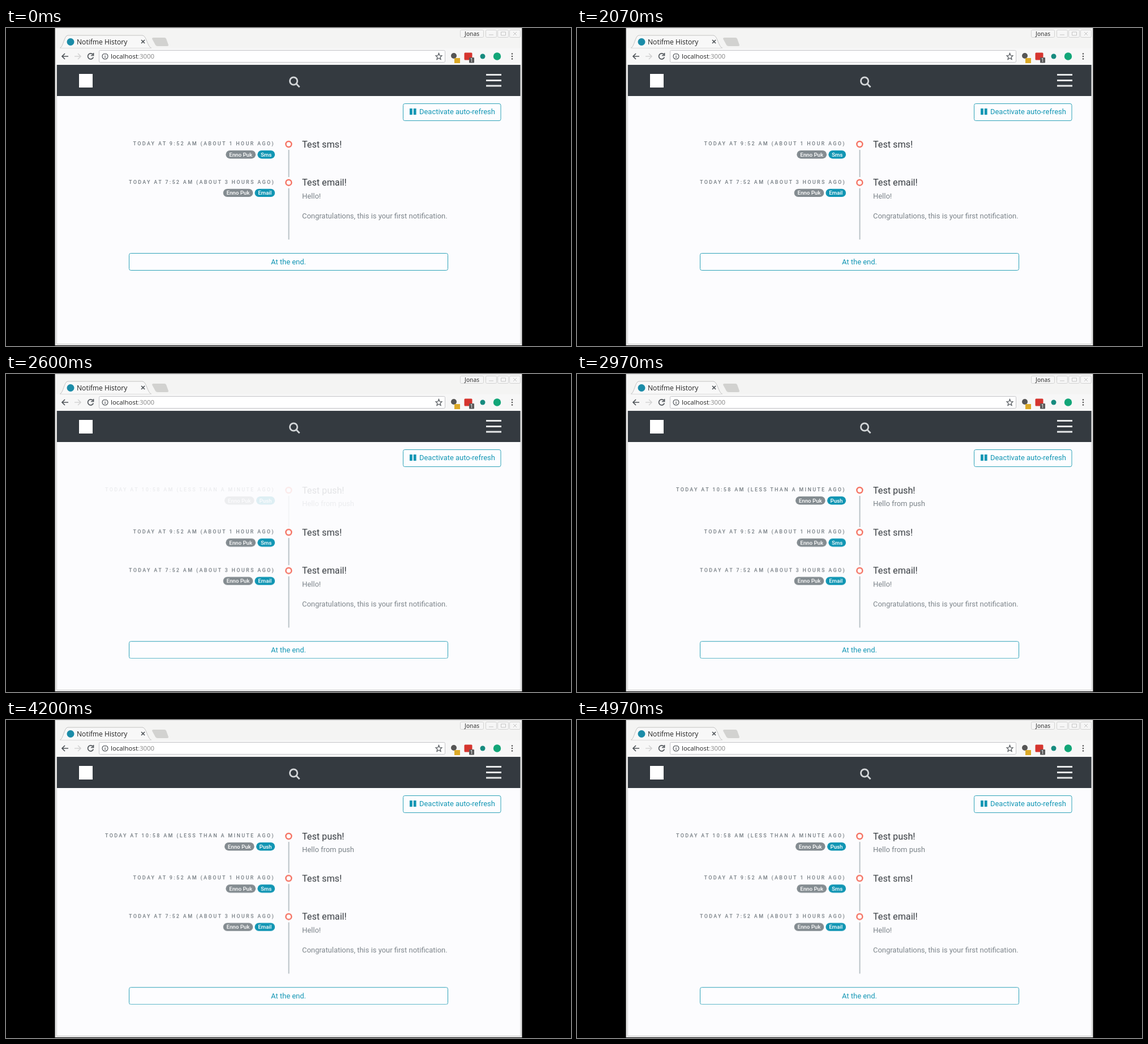
Recreate the animation shown at these times as an HTML page. Size 998 px wide and 561 px high, loop 5010 ms.

```html
<!DOCTYPE html>
<html lang="en">
<head>
<meta charset="utf-8">
<title>Notifme History</title>
<style>
  html, body { margin: 0; width: 100%; height: 100%; overflow: hidden; background: #000; }
  svg { display: block; width: 998px; height: 561px; }
  text { font-family: Roboto, Arial, sans-serif; font-size: 12.94px; fill: #7b8389; }
  .ui { font-family: "Open Sans", "Noto Sans", sans-serif; font-size: 12.1px; font-weight: 500; fill: #222; }
  .url { font-size: 11.45px; }
  .user { font-size: 10px; font-weight: 600; fill: #555; text-anchor: middle; }
  .title { font-size: 16.18px; fill: #373c41; }
  .date { font-size: 8.96px; font-weight: 500; letter-spacing: 2.35px; fill: #737b81; }
  .pill { font-size: 9.7px; font-weight: 500; fill: #fff; text-anchor: middle; }
  .count { font-size: 8.5px; fill: #fff; text-anchor: middle; }
  .teal { fill: #1296b4; }
  .box { fill: #fdfdff; stroke: #2ea2b8; }
  .icon { fill: none; stroke: #50555a; stroke-width: 1.7; }
  .thin { stroke-width: 1.2; }
  .off { stroke: #d4d4d4; }
  .win { fill: #f6f6f6; stroke: #d2d2d2; }
</style>
</head>
<body>
<svg viewBox="0 0 998 561">
  <!-- window and tab strip -->
  <rect x="86.5" width="825" height="560" fill="#e4e4e4"/>
  <rect x="88" y="1" width="822" height="557.5" fill="#f4f4f3"/>
  <path d="M95 35.5C101 34 103 13 109 13H241C248 13 250 34 257 35.5Z" fill="#f8f8f8" stroke="#c2c2c2"/>
  <path d="M260 17H280Q282 17 283 19L287 30Q287 32 285 32H268Q265 32 264 30L258 19Q258 17 260 17Z" fill="#d2d2d0"/>
  <circle cx="114" cy="24.5" r="6.5" fill="#1b8ca8"/>
  <text class="ui" x="125" y="28.5">Notifme History</text>
  <path class="icon" d="M239 21L245 27M245 21L239 27"/>
  <rect class="win" x="802.5" y="3.5" width="41" height="13" rx="2"/>
  <text class="ui user" x="823" y="13.5">Jonas</text>
  <g class="win">
    <rect x="847.5" y="3.5" width="19" height="13" rx="2"/>
    <rect x="868.5" y="3.5" width="19" height="13" rx="2"/>
    <rect x="889.5" y="3.5" width="19" height="13" rx="2"/>
    <path d="M853 12H861M874.5 7H882.5V13H874.5ZM896 7L902 13M902 7L896 13" fill="none" stroke="#c4c4c4"/>
  </g>

  <!-- toolbar -->
  <rect x="89" y="35.5" width="820" height="30" fill="#f7f7f7"/>
  <rect x="164.5" y="39.5" width="611" height="21" rx="2" fill="#fff" stroke="#c4c4c8"/>
  <path class="icon" d="M110 50H99M104 45L99 50L104 55"/>
  <path class="icon off" d="M121 50H132M127 45L132 50L127 55"/>
  <path class="icon" d="M153.6 47A5 5 0 1 0 154.3 51.5M154.5 44V48.5H150"/>
  <circle class="icon thin" cx="175" cy="50" r="5"/>
  <path class="icon thin" d="M175 49V53M175 46.5V48"/>
  <text class="ui url" x="185" y="54">localhost<tspan fill="#858585">:3000</tspan></text>
  <path class="icon thin" d="M764.5 44.5L766 48.5L770 48.8L767 51.5L768 55.5L764.5 53.3L761 55.5L762 51.5L759 48.8L763 48.5Z"/>
  <circle cx="791" cy="49" r="5" fill="#565656"/>
  <rect x="792" y="53" width="10" height="9" fill="#dcaa28"/>
  <rect x="809.5" y="43.5" width="14" height="13" rx="1.5" fill="#d6352f"/>
  <rect x="818" y="52" width="9" height="9.5" rx="1" fill="#5b5b5b"/>
  <text class="count" x="822.5" y="60">1</text>
  <circle cx="842" cy="50" r="4.5" fill="#168b7f"/>
  <circle cx="867.5" cy="50" r="6.7" fill="#12a678"/>
  <g fill="#555">
    <circle cx="894" cy="45.5" r="1.3"/><circle cx="894" cy="50" r="1.3"/><circle cx="894" cy="54.5" r="1.3"/>
  </g>

  <!-- page -->
  <rect x="90" y="65" width="818.5" height="492" fill="#fcfcfe"/>
  <path d="M89.5 65V557.5H909V65" fill="none" stroke="#cfcfcf"/>
  <rect x="90" y="65" width="818.5" height="55" fill="#343a40"/>
  <rect x="129" y="81" width="24" height="24" fill="#fff"/>
  <g fill="none" stroke="#d3d6d8" stroke-width="2.8">
    <circle cx="508" cy="93.5" r="6.6"/><path d="M512.8 98.5L518.5 104.3"/>
  </g>
  <path d="M848 82.5H875M848 92.5H875M848 102H875" stroke="#e6e8e9" stroke-width="3"/>
  <rect class="box" x="701.5" y="133.5" width="172.5" height="30" rx="3"/>
  <path class="teal" d="M713 142H717.8V153H713ZM719.8 142H724.6V153H719.8Z"/>
  <text class="teal" x="730" y="152.3">Deactivate auto-refresh</text>
  <g id="fresh"></g>
  <g id="list">
    <rect class="box" x="217.5" y="397.5" width="563" height="30" rx="3"/>
    <text class="teal" x="499" y="416.6" text-anchor="middle">At the end.</text>
  </g>
</svg>
<script>
const LOOP = 5010, ENTER = 2460, FADE = 500, SHIFT = 74.2;
const fresh = document.getElementById('fresh');
const list = document.getElementById('list');

const text = (cls, x, y, s) => `<text class="${cls}" x="${x}" y="${y}">${s}</text>`;

function pill(left, right, y, fill, label) {
  return `<rect x="${left}" y="${y + 10.8}" width="${right - left}" height="14.4" rx="7.2" fill="${fill}"/>` +
    text('pill', (left + right) / 2, y + 21.4, label);
}

// y is the centre of the ring; nameBox and kindX are pill edges
function item(parent, { y, tail, date, dateX, nameBox, kindX, kind, title, lines = [] }) {
  parent.insertAdjacentHTML('beforeend',
    `<rect x="498.5" y="${y + 10}" width="2" height="${tail}" fill="#b9c1c6"/>` +
    `<circle cx="499.3" cy="${y}" r="5" fill="#fff" stroke="#f57566" stroke-width="2.5"/>` +
    text('date', dateX, y + 2.2, `TODAY AT ${date} AGO)`) +
    pill(...nameBox, y + .2, '#848c91', 'Enno Puk') +
    pill(kindX, 475, y + .2, '#1296b4', kind) +
    text('title', 523, y + 5.5, title) +
    lines.map(([dy, s]) => text('', 523, y + dy, s)).join(''));
}

item(fresh, { y: 205, tail: 55, date: '10:58 AM (LESS THAN A MINUTE', dateX: 175, nameBox: [386, 438.5],
  kindX: 442, kind: 'Push', title: 'Test push!', lines: [[28, 'Hello from push']] });
item(list, { y: 205, tail: 48, date: '9:52 AM (ABOUT 1 HOUR', dateX: 224.6, nameBox: [388.3, 441],
  kindX: 444.3, kind: 'Sms', title: 'Test sms!' });
item(list, { y: 272.7, tail: 90.5, date: '7:52 AM (ABOUT 3 HOURS', dateX: 217, nameBox: [383.6, 436.2],
  kindX: 439.4, kind: 'Email', title: 'Test email!',
  lines: [[27.8, 'Hello!'], [63.4, 'Congratulations, this is your first notification.']] });

const timing = { duration: LOOP, iterations: Infinity };
const at = ms => ms / LOOP;
const still = 'translate(0px, 0px)', moved = `translate(0px, ${SHIFT}px)`;

fresh.animate([
  { opacity: 0 },
  { opacity: 0, offset: at(ENTER) },
  { opacity: .01, offset: at(ENTER), easing: 'ease-in' },
  { opacity: 1, offset: at(ENTER + FADE) },
  { opacity: 1 }
], timing);

list.animate([
  { transform: still },
  { transform: still, offset: at(ENTER) },
  { transform: moved, offset: at(ENTER) },
  { transform: moved }
], timing);
</script>
</body>
</html>
```
